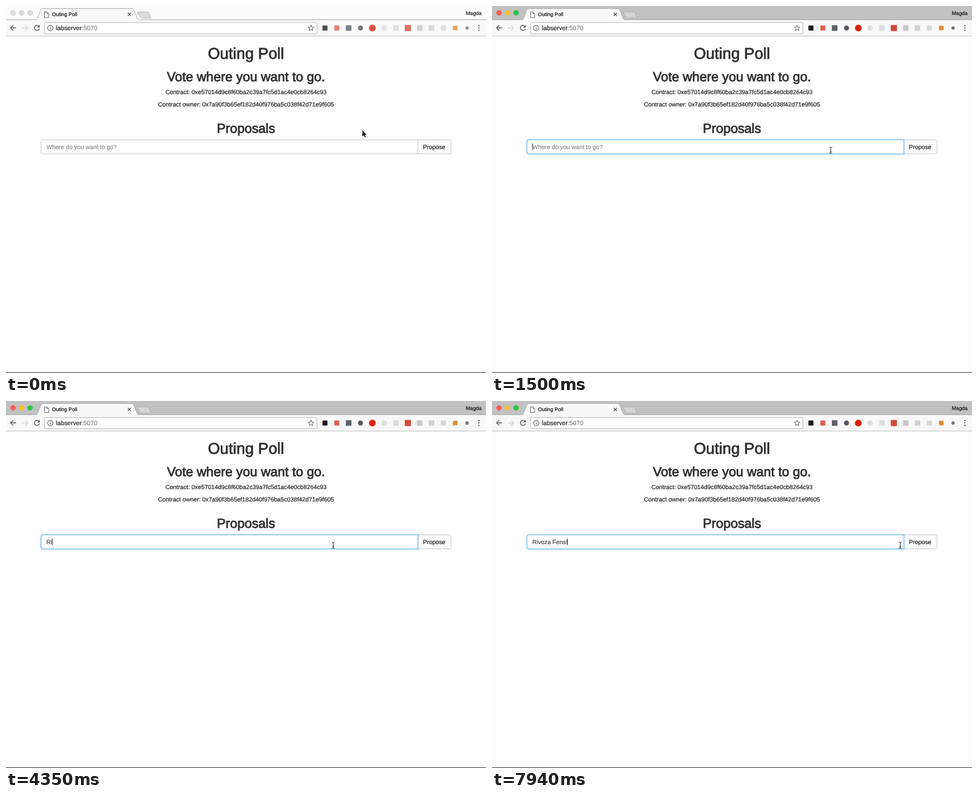
An HTML page for the animation above (8000 ms loop, 856x654 px).

```html
<!DOCTYPE html>
<html lang="en">
<head>
<meta charset="utf-8">
<title>Outing Poll</title>
<style>
html, body { margin: 0; width: 100%; height: 100%; overflow: hidden; background: #fefefe; }
svg { display: block; width: 856px; height: 654px; }
text, tspan { fill: currentColor; stroke: currentColor; }
text {
  font-family: "Liberation Sans", Arial, sans-serif; font-size: 10.75px;
  color: #1c1c1c; stroke-width: .2px; white-space: pre; text-rendering: geometricPrecision;
}
.mid { text-anchor: middle; }
.head { color: #303030; stroke-width: .85px; font-size: 23.4px; text-anchor: middle; }
.title { font-size: 27.8px; }
.small { font-size: 9.2px; color: #0c0c0c; }
.line { fill: none; stroke: #5a5a5a; stroke-width: 1.4; }
</style>
</head>
<body>
<svg viewBox="0 0 856 654" xmlns="http://www.w3.org/2000/svg">
  <defs>
    <filter id="blur" x="-5%" y="-60%" width="110%" height="220%"><feGaussianBlur stdDeviation="1.5"/></filter>
    <path id="field" d="M734.5 238.5H65.5Q62.5 238.5 62.5 241.5V260.5Q62.5 263.5 65.5 263.5H734.5Z"/>
  </defs>
  <rect width="856" height="654" fill="#fefefe"/>

  <!-- tab strip -->
  <rect id="strip" width="856" height="25"/>
  <g id="lights"></g>
  <path id="newTab" d="M236 10.5H252.5Q254 10.5 254.6 12L258 20Q258.4 21.5 257 21.5H241.5Q240 21.5 239.4 20L234.5 12Q234 10.5 236 10.5Z" stroke="#a9a9a9" stroke-width=".8"/>
  <rect y="25" width="856" height="28" fill="#f8f8f8"/>
  <path d="M0 24.5H52Q55 24.5 56 22L62 7Q63 4.5 66 4.5H224Q227 4.5 228 7L234 22Q235 24.5 238 24.5H856" fill="none" stroke="#a8a8a8"/>
  <path d="M53 25.5Q55.5 25 56.5 22.5L62.5 7.5Q63.5 5 66 5H224Q226.5 5 227.5 7.5L233.5 22.5Q234.5 25 237 25.5Z" fill="#f8f8f8"/>
  <path d="M68.5 10.5H73L76 13.5V20.5H68.5ZM73 10.5V13.5H76" fill="#fff" stroke="#555" stroke-width=".9"/>
  <text class="small" x="82" y="18">Outing Poll</text>
  <path class="line" d="M217.3 12.3L222.7 17.7M222.7 12.3L217.3 17.7"/>
  <text class="small" x="848" y="16" text-anchor="end">Magda</text>

  <!-- toolbar -->
  <path d="M0 53.5H856" stroke="#bcbcbc"/>
  <path class="line" d="M18 39H8.5M12.8 34.3L8.1 39L12.8 43.7"/>
  <path class="line" d="M29 39H38.5M34.2 34.3L38.9 39L34.2 43.7" style="stroke:#d2d2d2"/>
  <path class="line" d="M58.5 36A4.5 4.5 0 1 0 59.4 40.2"/>
  <path d="M60.2 33.6V38.2H55.6Z" fill="#5a5a5a"/>
  <rect x="68.5" y="29.5" width="486" height="20" rx="2" fill="#fff" stroke="#b4b4b4"/>
  <circle class="line" cx="79" cy="39.3" r="4.7" style="stroke-width:1.1"/>
  <path d="M79 38.4V42M79 36.3V37.5" stroke="#5a5a5a" stroke-width="1.2"/>
  <text x="89" y="43" style="font-size:11.2px">labserver<tspan style="color:#808080">:5070</tspan></text>
  <path id="star" class="line" style="stroke-width:1"/>
  <g id="icons"></g>
  <g fill="#5a5a5a"><circle cx="843.3" cy="34.8" r="1.2"/><circle cx="843.3" cy="39.1" r="1.2"/><circle cx="843.3" cy="43.4" r="1.2"/></g>

  <!-- page -->
  <text class="head title" x="428" y="93.5">Outing Poll</text>
  <text class="head" x="428" y="133.7">Vote where you want to go.</text>
  <text class="mid" x="428" y="156.8">Contract: 0xe57014d9c8f60ba2c39a7fc5d1ac4e0cb8264c93</text>
  <text class="mid" x="428" y="179.3">Contract owner: 0x7a90f3b65ef182d40f976ba5c038f42d71e9f605</text>
  <text class="head" x="428" y="226.2">Proposals</text>
  <path d="M734.5 238.5H790.5Q793.5 238.5 793.5 241.5V260.5Q793.5 263.5 790.5 263.5H734.5Z" fill="#fff" stroke="#c4c4c4"/>
  <text class="mid" x="763.5" y="254.8">Propose</text>
  <use id="glow" href="#field" fill="none" stroke="#66afe9" stroke-width="3" filter="url(#blur)"/>
  <use href="#field" fill="#fff" stroke="#c4c4c4"/>
  <use id="ring" href="#field" fill="none" stroke="#55b0ec"/>
  <text id="hint" x="72" y="254.8" style="color:#8a8a8a">Where do you want to go?</text>
  <text id="typed" x="72" y="254.8" style="color:#444"></text>
  <rect id="caret" y="245" width="1" height="12" fill="#333"/>

  <path d="M0 653.5H856" stroke="#2a2a2a"/>

  <path id="arrow" d="M0 0V11L2.5 8.7L4.2 12.6L5.9 11.9L4.2 8.1H7.4Z" fill="#000" stroke="#fff" stroke-width=".8" paint-order="stroke"/>
  <path id="beam" d="M-2.5 -5.5Q0 -5.5 0 -3.5Q0 -5.5 2.5 -5.5M0 -3.5V3.5M-2.5 5.5Q0 5.5 0 3.5Q0 5.5 2.5 5.5M-1.5 2H1.5" fill="none" stroke="#222"/>
</svg>
<script>
const LOOP = 8000;
const $ = id => document.getElementById(id);

function add(parent, tag, attrs) {
  const el = document.createElementNS("http://www.w3.org/2000/svg", tag);
  for (const key in attrs) el.setAttribute(key, attrs[key]);
  return parent.appendChild(el);
}

const show = (id, on) => $(id).setAttribute("visibility", on ? "visible" : "hidden");

const lights = ["#fc5b52", "#fcbc33", "#2ac640"].map((color, i) => ({
  color, el: add($("lights"), "circle", { cx: 12.5 + i * 15.2, cy: 12.2, r: 4.7 })
}));

// Toolbar buttons: shape, colour, size
const buttons = [
  ["s", "#1c1c1c", 9], ["s", "#e0604f", 9], ["s", "#5c6064", 10], ["c", "#55595c", 9],
  ["c", "#d9220f", 12], ["c", "#dedede", 10], ["s", "#dcdcdc", 10], ["s", "#d34a3b", 11],
  ["s", "#c8c8c8", 10], ["s", "#d2d2d2", 10], ["s", "#d8d8d8", 9], ["s", "#dc8b32", 8],
  ["c", "#737373", 6]
];
buttons.forEach(([shape, fill, size], i) => {
  const x = 568.8 + i * 21.12, y = 39.3, r = size / 2;
  if (shape === "c") add($("icons"), "circle", { cx: x, cy: y, r, fill });
  else add($("icons"), "rect", { x: x - r, y: y - r, width: size, height: size, rx: 1, fill });
});

const starPoints = Array.from({ length: 10 }, (_, i) => {
  const a = -Math.PI / 2 + i * Math.PI / 5, r = i % 2 ? 2.3 : 5.4;
  return (544 + r * Math.cos(a)).toFixed(2) + " " + (39.6 + r * Math.sin(a)).toFixed(2);
});
$("star").setAttribute("d", "M" + starPoints.join("L") + "Z");

// Pointer holds: start time, x, y, shape
const pointer = [
  [0, 635.6, 221.4, "arrow"], [150, 670, 209, "arrow"], [300, 703, 197, "arrow"],
  [750, 674, 224, "arrow"], [900, 644.6, 249.4, "arrow"], [1200, 645, 257, "beam"],
  [1350, 640, 257, "beam"], [1500, 604, 257, "beam"], [1650, 583.5, 257, "beam"],
  [7940, 728, 257, "beam"]
];

const phrase = "Rivoza Fens!";
const keyTimes = [3750, 4350, 4500, 5850, 6000, 6150, 6750, 6900, 7050, 7200, 7350, 7500];
const blinkOff = [[2100, 2550], [3000, 3600], [4950, 5550], [6600, 6750]];
const focusAt = 1350;

function draw(t) {
  const active = t >= 1050;
  $("strip").setAttribute("fill", active ? "#c1c1c1" : "#fcfcfc");
  $("newTab").setAttribute("fill", active ? "#d3d3d3" : "#dcdcdc");
  $("icons").setAttribute("opacity", active ? 1 : .78);
  for (const { el, color } of lights) {
    el.setAttribute("fill", active ? color : "#dcdcdc");
    el.setAttribute("stroke", active ? "none" : "#d0d0d0");
    el.setAttribute("stroke-width", .6);
  }

  const focus = t < focusAt ? 0 : t < focusAt + 150 ? .5 : 1;
  $("ring").setAttribute("opacity", focus);
  $("glow").setAttribute("opacity", focus * .4);

  const count = keyTimes.filter(k => k <= t).length;
  const typed = $("typed");
  typed.textContent = phrase.slice(0, count);
  show("hint", !count);
  const end = count ? typed.getComputedTextLength() : 0;
  $("caret").setAttribute("x", Math.round(72 + end - .5));
  show("caret", t >= focusAt + 150 && !blinkOff.some(([a, b]) => t >= a && t < b));

  const [, x, y, shape] = pointer.filter(p => p[0] <= t).pop();
  for (const id of ["arrow", "beam"]) {
    $(id).setAttribute("transform", `translate(${x} ${y})`);
    show(id, id === shape);
  }
}

function tick() {
  draw(performance.now() % LOOP);
  requestAnimationFrame(tick);
}
tick();
</script>
</body>
</html>
```
